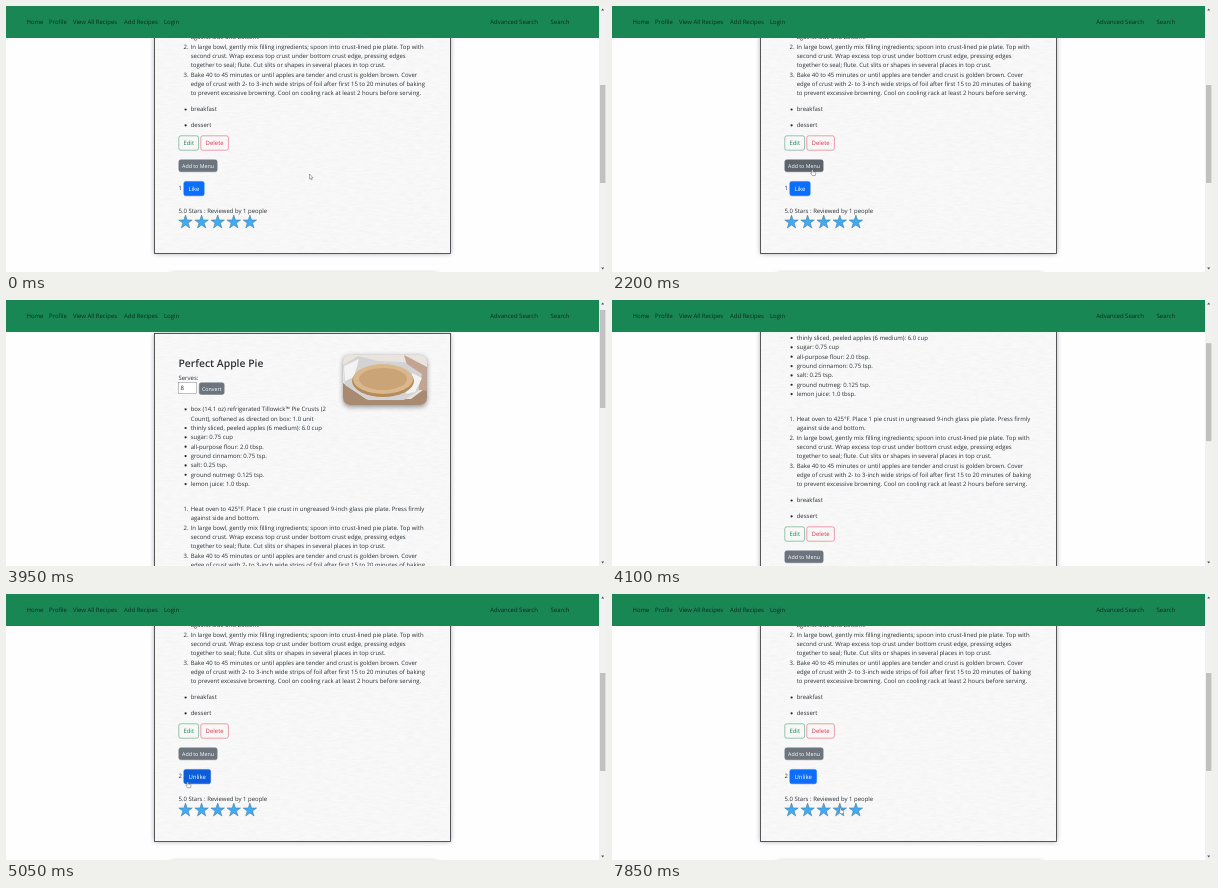
An HTML page for the animation above (8000 ms loop, 600 by 266 pixels).

```html
<!DOCTYPE html>
<html lang="en">
<head>
<meta charset="utf-8">
<title>Recipe page</title>
<style>
  html, body { margin: 0; width: 100%; height: 100%; overflow: hidden; background: #fefdff; }
  svg { display: block; width: 100vw; height: 100vh; }
  text { font: 5.98px "Open Sans", "Noto Sans", sans-serif; fill: #2b3035; text-rendering: geometricPrecision; white-space: pre; }
  .title { font-size: 10.35px; font-weight: 600; }
  .small { font-size: 5.3px; }
  .mid { text-anchor: middle; }
  .nav text { fill: #000; fill-opacity: .68; }
</style>
</head>
<body>
<svg id="stage" viewBox="0 0 600 266" preserveAspectRatio="none">
  <defs>
    <filter id="soft" x="-10%" y="-10%" width="120%" height="120%"><feGaussianBlur stdDeviation="2.6"/></filter>
    <filter id="paper" x="0" y="0" width="100%" height="100%">
      <feTurbulence type="fractalNoise" baseFrequency=".12 .6" numOctaves="2" seed="4"/>
      <feColorMatrix values="0 0 0 0 .5  0 0 0 0 .5  0 0 0 0 .5  .14 0 0 0 -.045"/>
    </filter>
    <clipPath id="photoClip"><rect x="337" y="-132" width="84" height="50" rx="7"/></clipPath>
  </defs>
  <g id="page"></g>
  <g class="nav" id="nav"><rect width="593" height="32" fill="#198754"/></g>
  <rect x="593" width="7" height="266" fill="#f1f1f1"/>
  <path d="M595.2 4.4L596.7 2.4L598.2 4.4ZM595.2 261.6L596.7 263.6L598.2 261.6Z" fill="#505050"/>
  <rect id="thumb" x="594" width="5.4" height="98" fill="#c1c1c1"/>
  <g id="pointer" fill="#fff" stroke="#444" stroke-width=".5" stroke-linejoin="round">
    <path id="arrow" d="M0 0V6L1.4 4.8L2.3 6.9L3.2 6.5L2.3 4.5H4.2Z"/>
    <path id="hand" d="M-.7 .4Q0 -.5 .7 .4V2.4L3.4 3Q4 3.2 3.9 4L3.3 6.8H-.2L-2 4.2Q-1.9 3.3 -.7 4.1Z"/>
  </g>
</svg>
<script>
const $ = id => document.getElementById(id);
const LOOP = 8000, STEP = 50, RELOAD = 3150;
const GREEN = '#198754', RED = '#dc3545', BLUE = '#0d6efd', GRAY = '#6c757d';

// y is the middle of the line
const label = (x, y, s, cls = '', extra = '') =>
  `<text x="${x}" y="${y + 2.15}" class="${cls}" ${extra}>${s}</text>`;
const bullet = y => `<circle cx="179.6" cy="${y + .3}" r="1.1" fill="#212529"/>`;
const box = (x, y, w, h, fill, extra = '') =>
  `<rect x="${x}" y="${y}" width="${w}" height="${h}" fill="${fill}" ${extra}/>`;
const button = (id, x, y, w, h, s, fill, ink, edge, cls = '') =>
  `<g id="${id}">${box(x, y, w, h, fill, `rx="2" stroke="${edge}" stroke-width=".45"`)}` +
  label(x + w / 2, y + h / 2, s, 'mid ' + cls, `style="fill:${ink}"`) + '</g>';

function star(cx, cy) {
  const points = Array.from({ length: 10 }, (_, i) => {
    const r = i % 2 ? 2.8 : 7.1, a = i * Math.PI / 5;
    return `${(cx + r * Math.sin(a)).toFixed(2)},${(cy - r * Math.cos(a)).toFixed(2)}`;
  });
  return `<polygon points="${points.join(' ')}" fill="#3fabf3" stroke="#527590" stroke-width=".55"/>`;
}

const ingredients = [
  'box (14.1 oz) refrigerated Tillowick™ Pie Crusts (2',
  'Count), softened as directed on box: 1.0 unit',
  'thinly sliced, peeled apples (6 medium): 6.0 cup',
  'sugar: 0.75 cup',
  'all-purpose flour: 2.0 tbsp.',
  'ground cinnamon: 0.75 tsp.',
  'salt: 0.25 tsp.',
  'ground nutmeg: 0.125 tsp.',
  'lemon juice: 1.0 tbsp.'
];
const directions = [
  '1.|Heat oven to 425°F. Place 1 pie crust in ungreased 9-inch glass pie plate. Press firmly',
  '|against side and bottom.',
  '2.|In large bowl, gently mix filling ingredients; spoon into crust-lined pie plate. Top with',
  '|second crust. Wrap excess top crust under bottom crust edge, pressing edges',
  '|together to seal; flute. Cut slits or shapes in several places in top crust.',
  '3.|Bake 40 to 45 minutes or until apples are tender and crust is golden brown. Cover',
  '|edge of crust with 2- to 3-inch wide strips of foil after first 15 to 20 minutes of baking',
  '|to prevent excessive browning. Cool on cooling rack at least 2 hours before serving.'
];

const photo =
  box(337, -131, 84, 51, '#000', 'rx="7" opacity=".4" filter="url(#soft)"') +
  `<g clip-path="url(#photoClip)">${box(337, -132, 84, 50, '#e9e4de')}
    <path d="M337 -104L360 -88H405L421 -100V-82H337Z" fill="#a88a70"/>
    <path d="M398 -132L421 -120V-96L408 -98Z" fill="#c3a391"/>
    <path d="M337 -122L352 -131L372 -126L398 -125L416 -113L412 -96L398 -87L362 -87L339 -102Z" fill="#d3d3d5"/>
    <path d="M338 -121L353 -128L348 -110L339 -106ZM406 -114L416 -109L409 -95L400 -93Z" fill="#f3f3f4"/>
    <ellipse cx="377" cy="-106" rx="31" ry="16" fill="#b58a5c"/>
    <ellipse cx="377" cy="-108" rx="30" ry="15" fill="#d8b88c"/>
    <ellipse cx="377" cy="-108" rx="24" ry="11" fill="#caa376"/>
  </g>`;

const card = (fill, extra) => box(148.5, -153.5, 296, 401, fill, extra);

$('page').innerHTML =
  card('#000', 'opacity=".36" filter="url(#soft)"') +
  box(165, 268, 266, 120, '#000', 'opacity=".4" filter="url(#soft)"') +
  box(163, 269.5, 268, 120, '#f7f7f7') +
  card('#f9f9f9') +
  card('#fff', 'filter="url(#paper)"') +
  card('none', 'stroke="#333" stroke-width=".8"') +
  photo +
  label(172.5, -122.2, 'Perfect Apple Pie', 'title') +
  label(172.5, -109.5, 'Serves:') +
  box(172.7, -104.3, 18, 11, '#fff', 'stroke="#777" stroke-width=".45"') +
  label(174.5, -98.8, '8') +
  button('convert', 193.2, -104.3, 25, 11.8, 'Convert', GRAY, '#fff', GRAY, 'small') +
  ingredients.map((s, i) => {
    const y = -78 + i * 9.35;
    return (i === 1 ? '' : bullet(y)) + label(184.7, y, s);
  }).join('') +
  directions.map((line, i) => {
    const [n, s] = line.split('|'), y = 22 + i * 9.33;
    return label(182.6, y, n, '', 'text-anchor="end"') + label(184.7, y, s);
  }).join('') +
  bullet(103.2) + label(184.7, 103.2, 'breakfast') +
  bullet(119) + label(184.7, 119, 'dessert') +
  button('edit', 172.8, 129.8, 19.8, 14.4, 'Edit', 'transparent', GREEN, GREEN) +
  button('delete', 194.8, 129.8, 27.6, 14.4, 'Delete', 'transparent', RED, RED) +
  button('menu', 172.8, 153.8, 38.4, 12, 'Add to Menu', GRAY, '#fff', GRAY, 'small') +
  label(172.5, 182.2, '1', '', 'id="count"') +
  button('like', 177.8, 175.4, 20.4, 14.4, 'Like', BLUE, '#fff', BLUE) +
  button('unlike', 177.8, 175.4, 26.8, 14.4, 'Unlike', BLUE, '#fff', BLUE) +
  label(172.5, 204.4, '5.0 Stars : Reviewed by 1 people') +
  [0, 1, 2, 3, 4].map(i => star(179.5 + i * 16.1, 216.2)).join('');

$('nav').innerHTML += [
  [20.5, 'Home'], [43, 'Profile'], [67, 'View All Recipes'], [118, 'Add Recipes'],
  [158, 'Login'], [484.3, 'Advanced Search'], [544.6, 'Search']
].map(([x, s]) => label(x, 16, s)).join('');

// rows: time, then values
const pointerPath = [
  [0, 303.5, 168], [900, 303.5, 168], [1200, 262, 154], [1450, 212, 135], [1700, 211, 135],
  [2100, 204, 158], [2550, 188, 184], [2850, 188, 184], [3100, 186.5, 186.5], [3800, 186.5, 186.5],
  [4300, 187.5, 185], [4650, 187.5, 185], [5450, 176, 191], [5500, 176, 191], [6100, 172.5, 184.5],
  [6250, 172.5, 184.5], [6700, 178, 208], [7050, 195, 214], [7100, 195, 214], [7850, 228.5, 214]
];
const scrollPath = [
  [3850, 194], [3950, 187], [4050, 130], [4150, 64], [4250, 14], [4300, 5.8], [4400, 0]
];
const areas = {
  delete: [194.5, 129.5, 222.5, 144.5],
  menu: [172.5, 153.5, 211.5, 166],
  like: [177.5, 175, 198.5, 190],
  unlike: [177.5, 175, 205, 190],
  stars: [172, 209, 251, 223]
};

function sample(rows, t) {
  const next = rows.findIndex(row => row[0] > t);
  if (next < 0) return rows[rows.length - 1].slice(1);
  if (next === 0) return rows[0].slice(1);
  const a = rows[next - 1], b = rows[next], k = (t - a[0]) / (b[0] - a[0]);
  return a.slice(1).map((v, i) => v + (b[i + 1] - v) * k);
}

const scrollAt = t => t < RELOAD ? 0 : sample(scrollPath, t)[0];

function over(id, t) {
  const [x, y] = sample(pointerPath, t), offset = scrollAt(t);
  const [x0, y0, x1, y1] = areas[id];
  return offset < 8 && x >= x0 && x <= x1 && y >= y0 + offset && y <= y1 + offset;
}

// Share of the last 200 ms spent over an area: a short linear fade
const fade = (id, t) =>
  [0, 1, 2, 3].filter(i => over(id, t - i * STEP) && scrollAt(t - i * STEP) === 0).length / 4;
const mix = (from, to, k) => `color-mix(in srgb, ${to} ${k * 100}%, ${from})`;
const show = (id, on) => $(id).setAttribute('display', on ? 'inline' : 'none');

function paint(id, fill, ink, edge) {
  const { firstChild: rect, lastChild: text } = $(id);
  rect.style.fill = fill;
  rect.style.stroke = edge;
  text.style.fill = ink;
}

function draw(t) {
  const liked = t >= RELOAD, offset = scrollAt(t);
  const like = liked ? 'unlike' : 'like';
  const [x, y] = sample(pointerPath, t);
  const hand = ['delete', 'menu', like, 'stars'].some(id => over(id, t));

  $('page').setAttribute('transform', `translate(0 ${offset})`);
  $('thumb').setAttribute('y', 79 - offset * .369);
  $('count').textContent = liked ? '2' : '1';
  show('like', !liked);
  show('unlike', liked);

  const red = fade('delete', t);
  paint('delete', mix('transparent', RED, red), mix(RED, 'white', red), RED);
  const menuFill = mix(GRAY, '#5c636a', fade('menu', t));
  paint('menu', menuFill, '#fff', menuFill);
  const likeFill = mix(BLUE, '#0b5ed7', fade(like, t));
  paint(like, likeFill, '#fff', likeFill);

  $('pointer').setAttribute('transform', `translate(${x} ${y}) scale(.85)`);
  show('pointer', offset < 8);
  show('hand', hand);
  show('arrow', !hand);
}

const start = performance.now();
function tick() {
  const t = (performance.now() - start) % LOOP;
  draw(Math.floor(t / STEP) * STEP);
  requestAnimationFrame(tick);
}
tick();
</script>
</body>
</html>
```
